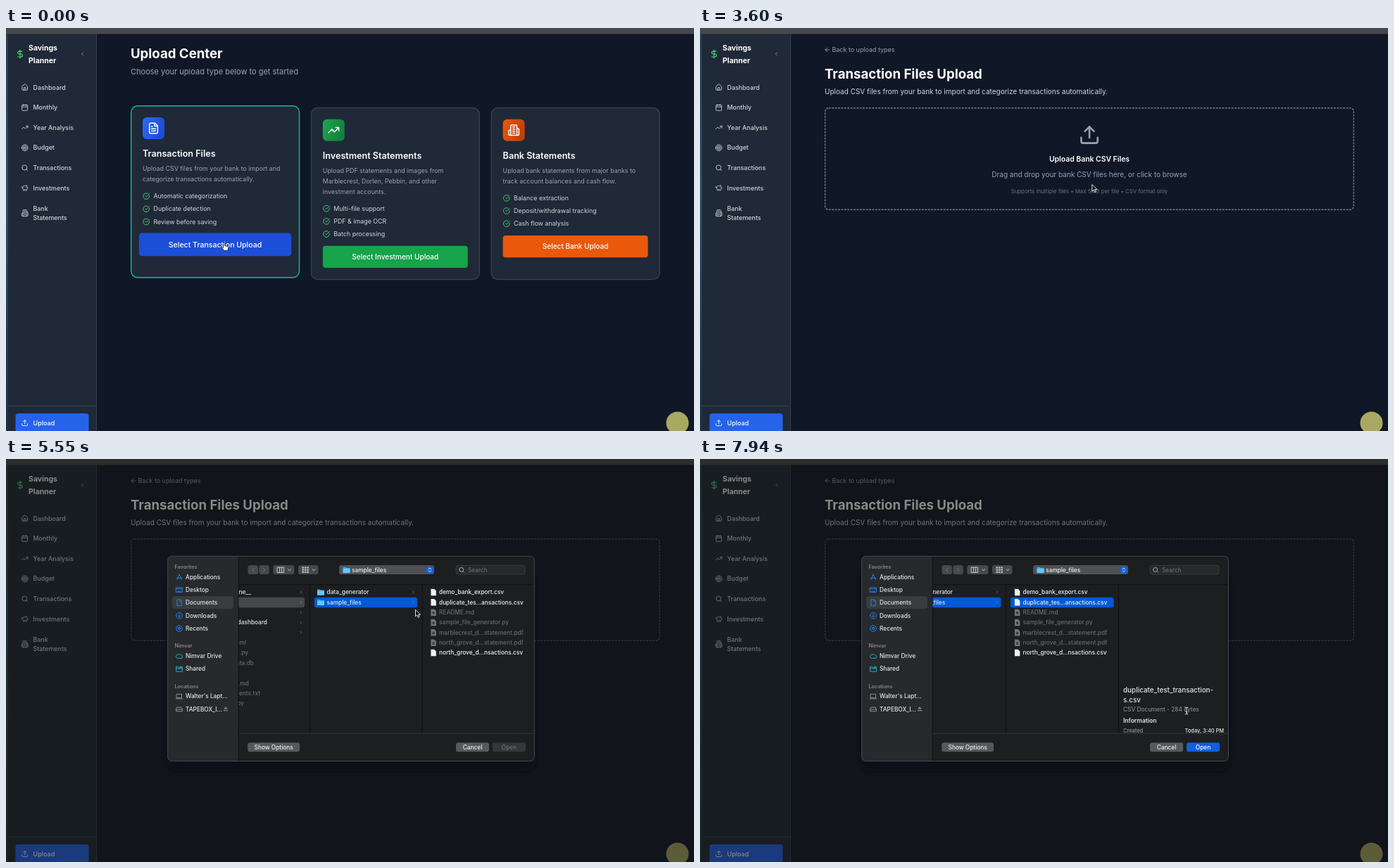
Animation, 977 px wide and 573 px high, one loop 8000 ms. Source, as an HTML page:

```html
<!DOCTYPE html>
<html lang="en">
<head>
<meta charset="utf-8">
<title>Upload Center</title>
<style>
html, body { margin: 0; width: 100%; height: 100%; overflow: hidden; background: #101726; }
svg { display: block; font-family: Inter, "Liberation Sans", sans-serif; white-space: pre; }
</style>
</head>
<body>
<svg id="stage" width="977" height="573" viewBox="0 0 977 573"></svg>
<script>
const stage = document.getElementById('stage');
const LOOP = 8000;

// Icons on a 24 unit grid
const ring = (x, y, r) => `M${x - r} ${y}a${r} ${r} 0 1 0 ${2 * r} 0a${r} ${r} 0 1 0 ${-2 * r} 0`;
const ICONS = {
  house: 'M3 10a2 2 0 0 1 .7-1.5l7-6a2 2 0 0 1 2.6 0l7 6A2 2 0 0 1 21 10v9a2 2 0 0 1-2 2H5a2 2 0 0 1-2-2zM15 21v-8H9v8',
  calendar: 'M8 2v4M16 2v4M3 10h18M5 4h14a2 2 0 0 1 2 2v14a2 2 0 0 1-2 2H5a2 2 0 0 1-2-2V6a2 2 0 0 1 2-2z',
  trend: 'M16 7h6v6M22 7l-8.5 8.5-5-5L2 17',
  target: ring(12, 12, 10) + ring(12, 12, 6) + ring(12, 12, 2),
  search: ring(11, 11, 8) + 'M21 21l-4.3-4.3',
  piggy: 'M11 17h3v2a1 1 0 0 0 1 1h2a1 1 0 0 0 1-1v-3a3.2 3.2 0 0 0 2-2h1a1 1 0 0 0 1-1v-2a1 1 0 0 0-1-1h-1a5 5 0 0 0-2-4V3a4 4 0 0 0-3.2 1.6l-.3.4H11a6 6 0 0 0-6 6v1a5 5 0 0 0 2 4v3a1 1 0 0 0 1 1h2a1 1 0 0 0 1-1zM16 10h.01M2 8v1a2 2 0 0 0 2 2h1',
  building: 'M6 22V4a2 2 0 0 1 2-2h8a2 2 0 0 1 2 2v18zM6 12H4a2 2 0 0 0-2 2v6a2 2 0 0 0 2 2h2M18 9h2a2 2 0 0 1 2 2v9a2 2 0 0 1-2 2h-2M10 6h4M10 10h4M10 14h4M10 18h4',
  upload: 'M21 15v4a2 2 0 0 1-2 2H5a2 2 0 0 1-2-2v-4M17 8l-5-5-5 5M12 3v12',
  file: 'M15 2H6a2 2 0 0 0-2 2v16a2 2 0 0 0 2 2h12a2 2 0 0 0 2-2V7zM14 2v6h6M16 13H8M16 17H8M10 9H8',
  check: 'M21.8 10A10 10 0 1 1 17 3.3M9 11l3 3L22 4',
  dollar: 'M12 2v20M17 5H9.5a3.5 3.5 0 0 0 0 7h5a3.5 3.5 0 0 1 0 7H6',
  back: 'M19 12H5M12 19l-7-7 7-7',
  left: 'M15 18l-6-6 6-6',
  right: 'M9 18l6-6-6-6',
  down: 'M6 9l6 6 6-6',
  updown: 'M7 9l5-5 5 5M7 15l5 5 5-5',
  apps: 'M12 3L5 20M12 3l7 17M3 15h18',
  desktop: 'M2 4h20v15H2zM2 8h20M6 16h12',
  page: 'M14 2H5v20h14V7zM14 2v5h5',
  download: ring(12, 12, 10) + 'M12 6v11M8 13l4 4 4-4',
  clock: ring(12, 12, 10) + ring(12, 12, 4) + 'M12 8v4h3',
  cloud: 'M17.5 19H8a6 6 0 1 1 2-11.5 5.5 5.5 0 0 1 9.5 3A4.3 4.3 0 0 1 17.5 19z',
  shared: 'M2 20V5h7l2 3h11v12zM2 11h20M15 5h7',
  laptop: 'M4 5h16v12H4zM1 20h22',
  drive: 'M5 6h14l3 7v6H2v-6zM2 13h20',
  columns: 'M2 4h20v16H2zM9 4v16M15.5 4v16'
};

const icon = (name, x, y, size, color, weight = 2) =>
  `<path d="${ICONS[name]}" transform="translate(${x - size / 2} ${y - size / 2}) scale(${size / 24})"
    fill="none" stroke="${color}" stroke-width="${weight}" stroke-linecap="round" stroke-linejoin="round"/>`;

// y is the middle of the capital letters
const text = (x, y, size, str, fill = '#fff', weight = 400, anchor = 'start') =>
  `<text x="${x}" y="${y + size * .36}" font-size="${size}" fill="${fill}" font-weight="${weight}" text-anchor="${anchor}">${str}</text>`;

const rect = (x, y, w, h, fill, r = 0, extra = '') =>
  `<rect x="${x}" y="${y}" width="${w}" height="${h}" rx="${r}" fill="${fill}" ${extra}/>`;

const line = (x1, y1, x2, y2, color) =>
  `<path d="M${x1} ${y1}L${x2} ${y2}" stroke="${color}"/>`;

const gradient = (id, a, b) =>
  `<linearGradient id="${id}" x2="1" y2=".4"><stop stop-color="${a}"/><stop offset="1" stop-color="${b}"/></linearGradient>`;

const DEFS = `<defs>
  ${gradient('blue', '#2b6bee', '#1d4ed8')}${gradient('green', '#1fa650', '#15803d')}${gradient('orange', '#ea580c', '#c2410c')}
  <linearGradient id="edge" x2="0" y2="1"><stop stop-color="#2b3a49"/><stop offset=".4" stop-color="#2c5069"/><stop offset="1" stop-color="#22303e"/></linearGradient>
  <filter id="soft" x="-10%" y="-10%" width="120%" height="120%"><feGaussianBlur stdDeviation="2.5"/></filter>
  <clipPath id="browser"><rect x="330.5" y="179" width="420" height="211"/></clipPath>
</defs>`;

const NAV = [['house', 'Dashboard'], ['calendar', 'Monthly'], ['trend', 'Year Analysis'],
  ['target', 'Budget'], ['search', 'Transactions'], ['piggy', 'Investments']];

function shell() {
  const soft = '#d1d5db';
  return rect(0, 0, 977, 573, '#101726') + rect(3, 8, 125.5, 565, '#1f2937') +
    line(128.5, 8, 128.5, 573, '#374151') + line(3, 537.5, 128, 537.5, '#374151') +
    rect(0, 0, 3, 573, 'url(#edge)') + rect(0, 0, 977, 8.5, '#46494d') +
    icon('dollar', 20, 37, 13.5, '#4ade80') + icon('left', 108.5, 37, 9, '#9ca3af') +
    text(32, 28, 10.5, 'Savings', '#fff', 700) + text(32, 46.5, 10.5, 'Planner', '#fff', 700) +
    NAV.map(([name, label], i) => {
      const y = 84.3 + i * 28.65;
      return icon(name, 26.7, y, 10.5, soft) + text(38.5, y, 8.9, label, soft, 500);
    }).join('') +
    icon('building', 26.7, 263, 10.5, soft) +
    text(38.5, 256.5, 8.9, 'Bank', soft, 500) + text(38.5, 269.5, 8.9, 'Statements', soft, 500) +
    rect(13.5, 548, 104, 32, '#2563eb', 4) +
    icon('upload', 26.7, 561.5, 10.5, '#fff') + text(38.5, 561.5, 9, 'Upload', '#fff', 500) +
    '<circle cx="953.5" cy="561.5" r="16" fill="#a9a862"/>';
}

const CARDS = [
  { x: 177, icon: 'file', tone: 'blue', button: '#1d4ed8', title: 'Transaction Files', action: 'Select Transaction Upload',
    about: ['Upload CSV files from your bank to import and', 'categorize transactions automatically.'],
    list: ['Automatic categorization', 'Duplicate detection', 'Review before saving'] },
  { x: 432.8, icon: 'trend', tone: 'green', button: '#16a34a', title: 'Investment Statements', action: 'Select Investment Upload',
    about: ['Upload PDF statements and images from', 'Marblecrest, Dorlen, Pebbin, and other', 'investment accounts.'],
    list: ['Multi-file support', 'PDF &amp; image OCR', 'Batch processing'] },
  { x: 688.6, icon: 'building', tone: 'orange', button: '#ea580c', title: 'Bank Statements', action: 'Select Bank Upload',
    about: ['Upload bank statements from major banks to', 'track account balances and cash flow.'],
    list: ['Balance extraction', 'Deposit/withdrawal tracking', 'Cash flow analysis'] }
];

function card(c, i) {
  const hover = i === 0, left = c.x + 17, first = 212 + c.about.length * 14.8;
  const mid = first + 69, zoom = hover ? 1.05 : 1, cx = c.x + 120;
  return `<g transform="translate(0 ${hover ? -2.7 : 0})">` +
    rect(c.x + .7, 113.5, 238.8, 244, '#1f2937', 9, `stroke="${hover ? '#14b8a6' : '#374151'}" stroke-width="1.4"`) +
    rect(left, 129.7, 31, 31, `url(#${c.tone})`, 6) + icon(c.icon, left + 15.5, 145.2, 17.5, '#fff') +
    text(left, 181, 12.6, c.title, '#fff', 600) +
    c.about.map((s, n) => text(left, 202.8 + n * 14.8, 8.9, s, '#9ca3af')).join('') +
    c.list.map((s, n) => icon('check', left + 5.2, first + .2 + n * 18.2, 10.5, '#4ade80') +
      text(left + 15.5, first + n * 18.2, 8.9, s, '#d1d5db')).join('') +
    `<g transform="translate(${cx} ${mid}) scale(${zoom})">` +
    rect(-103, -15.6, 206, 31.2, c.button, 4) + text(0, 0, 10.05, c.action, '#fff', 500, 'middle') + '</g></g>';
}

const chooser = () => text(177, 36.5, 18.6, 'Upload Center', '#fff', 700) +
  text(177, 62, 11, 'Choose your upload type below to get started', '#9ca3af') + CARDS.map(card).join('');

const dropPage = hover => icon('back', 180.8, 31, 10, '#9ca3af') +
  text(187.5, 31, 8.95, 'Back to upload types', '#9ca3af') +
  text(177, 65, 18.6, 'Transaction Files Upload', '#fff', 700) +
  text(177, 90, 10, 'Upload CSV files from your bank to import and categorize transactions automatically.', '#d1d5db') +
  rect(177.7, 113.7, 750.6, 144.6, 'none', 5,
    `stroke="${hover ? '#747b88' : '#4b5563'}" stroke-width="1.4" stroke-dasharray="2.9 1.5"`) +
  icon('upload', 553, 152, 31, '#9ca3af') +
  text(553, 186, 10.4, 'Upload Bank CSV Files', '#fff', 600, 'middle') +
  text(553, 208.5, 10, 'Drag and drop your bank CSV files here, or click to browse', '#9ca3af', 400, 'middle') +
  text(553, 232, 7.8, 'Supports multiple files • Max 5MB per file • CSV format only', '#6b7280', 400, 'middle');

// File dialog
const folder = (x, y) => `<path d="M${x - 5} ${y - 4}h4l1 1.2h5v7h-10z" fill="#35b5f0"/>` +
  rect(x - 5, y - 1.6, 10, 5.8, '#5ecbfa', .8);

const sheet = (x, y, fill, mark) =>
  `<path d="M${x - 3.6} ${y - 4.7}h4.7l2.7 2.7v6.8h-7.4z" fill="${fill}"/>` +
  (mark ? rect(x - 1.5, y - 1, 3, 3.5, '#3a3b3d', .5) : '');

const row = n => 189.4 + n * 14.35;
const label = (x, y, str, fill, anchor) => text(x, y, 8.3, str, fill, 500, anchor);
const bar = (x, w, n, color) => rect(x, row(n) - 6.9, w, 14.4, color, 3);

const PLACES = [['apps', 'Applications', 168], ['desktop', 'Desktop', 186.3], ['page', 'Documents', 204.3],
  ['download', 'Downloads', 222.6], ['clock', 'Recents', 241], ['cloud', 'Nimvar Drive', 280.2],
  ['shared', 'Shared', 298.3], ['laptop', "Walter's Lapt...", 337.4], ['drive', 'TAPEBOX_I...', 355.7]];
const FILES = ['demo_bank_export.csv', 'duplicate_tes...ansactions.csv', 'README.md', 'sample_file_generator.py',
  'marblecrest_d...statement.pdf', 'north_grove_d...statement.pdf', 'north_grove_d...nsactions.csv'];
// Visible ends of the names in the scrolled parent column: row, right edge, name
const PARENTS = [[0, 348, 'ne__'], [3, 371, 'dashboard'], [5, 341, 'ml'], [6, 344, '.py'], [7, 352, 'ata.db'],
  [9, 345, '.md'], [10, 361, 'ents.txt'], [11, 338, 'py']];

function places(active) {
  const tint = y => y < 250 ? '#1e8dff' : y < 310 ? '#19bfd0' : '#9a9c9f';
  return [['Favorites', 153.5], ['Nimvar', 265.5], ['Locations', 323]]
    .map(([s, y]) => text(239.5, y, 7.2, s, '#85878a', 600)).join('') +
    rect(236, 195, 87, 18, active ? '#3a3b3e' : '#34373b', 4) +
    `<g opacity="${active ? 1 : .42}">` +
    PLACES.map(([name, s, y]) => icon(name, 246, y, 10.5, tint(y)) + label(255, y, s, '#e6e6e7')).join('') +
    '</g><path d="M309 355.5l3-3.5 3 3.5zM309 357h6v1.2h-6z" fill="#85878a"/>';
}

function browser(t, active) {
  const blue = '#0059d6', grey = '#464749', moved = t >= 7790;
  const parent = !active || (t >= 7490 && t < 7640) ? grey : blue;
  const picked = t >= 7640 ? blue : '#0b4fb5';
  const chevron = (x, n) => icon('right', x, row(n), 7, '#96989b');
  let s = '';
  if (!moved) {
    s += bar(300, 124, 1, grey) + [0, 1, 2, 3, 4].map(n => chevron(419, n)).join('') +
      PARENTS.map(([n, x, name]) => label(x, row(n), name, n < 5 ? '#e6e6e7' : '#68696b', 'end')).join('');
  }
  s += bar(438, 146, 1, parent) + (t >= 7490 ? bar(597.5, 146.5, 1, picked) : '') +
    ['data_generator', 'sample_files'].map((name, n) =>
      folder(447, row(n)) + label(455.5, row(n), name, '#e9e9ea') + chevron(578.5, n)).join('') +
    FILES.map((name, n) => {
      const usable = name.endsWith('csv');
      return sheet(607, row(n), usable ? '#f0f0f1' : '#737476', !usable) +
        label(615, row(n), name, usable ? '#f0f0f1' : '#68696b');
    }).join('') +
    [431.5, 591, 751].map(x => line(x, 179, x, 390, '#0e0f10')).join('');
  const preview = text(601, 328.5, 9.9, 'duplicate_test_transaction-', '#e6e6e7', 500) +
    text(601, 342.5, 9.9, 's.csv', '#e6e6e7', 500) +
    text(601, 356.5, 8.3, 'CSV Document - 284 bytes', '#97989a') +
    text(601, 372, 8.5, 'Information', '#e6e6e7', 600) +
    text(601, 386.7, 7.4, 'Created', '#97989a', 500) +
    text(744, 386.7, 7.4, 'Today, 3:40 PM', '#e6e6e7', 500, 'end');
  return `<g clip-path="url(#browser)"><g transform="translate(${moved ? -156.5 : 0})">${s}</g>${moved ? preview : ''}</g>`;
}

function toolbar(active) {
  const y = 157.7, top = 151, fill = '#47484a', mark = '#d5d5d6';
  let grid = '';
  for (let i = 0; i < 9; i++) grid += rect(420.5 + i % 3 * 3.4, 153.3 + Math.floor(i / 3) * 3.2, 2.5, 2.3, '#b9babb');
  return rect(343.5, top, 14.5, 13, fill, 3) + rect(359.3, top, 14.5, 13, fill, 3) +
    icon('left', 350.7, y, 10, '#85868a') + icon('right', 366.7, y, 10, '#85868a') +
    rect(379.3, top, 30, 13, fill, 3) + icon('columns', 390, y, 11, mark) + icon('down', 402.5, y, 8, mark, 3) +
    rect(415, top, 28.5, 13, fill, 3) + grid + icon('down', 437, y, 8, mark, 3) +
    rect(473, top, 135, 13, '#505154', 3) + folder(483.5, y) + label(491, y, 'sample_files', '#f0f0f1') +
    (active ? rect(597, 152.7, 9.5, 10, '#0f62e6', 2.5) : '') + icon('updown', 601.8, y, 8.5, '#fff', 2.6) +
    rect(639, top + .3, 98, 12.7, '#27282a', 3, 'stroke="#3f4042" stroke-width=".8"') +
    icon('search', 647, y, 9, mark) + text(656, y, 8.3, 'Search', '#77787b');
}

const button = (x, w, str, fill, color) =>
  rect(x, 403.3, w, 13, fill, 3) + label(x + w / 2, 409.8, str, color, 'middle');

function dialog(t) {
  const settled = t >= 3900, active = t >= 4050, ready = t >= 7790;
  const shade = settled ? rect(0, 0, 977, 573, '#12130e', 0, 'opacity=".5"') : rect(0, 0, 977, 573, '#18191a', 0, 'opacity=".37"');
  const glow = settled
    ? rect(228, 160, 524, 284, '#0d0f12', 16, 'filter="url(#soft)" opacity=".6"')
    : rect(206, 126, 570, 340, '#1a1b1c', 26, 'filter="url(#soft)"') + rect(222, 132, 536, 316, '#10121b', 20, 'filter="url(#soft)"');
  return shade + `<g transform="translate(0 ${settled ? 0 : -4.5})">` + glow +
    rect(229.5, 138, 521, 291.7, '#1d1e20', 6) +
    `<path d="M330 138V429.7H235.5a6 6 0 0 1-6-6V144a6 6 0 0 1 6-6z" fill="${active ? '#27292c' : '#222528'}"/>` +
    line(330.2, 138, 330.2, 429.5, '#101112') + line(331, 178.7, 750, 178.7, '#0f1011') + line(331, 390.3, 750, 390.3, '#343537') +
    toolbar(active) + places(active) + browser(t, active) +
    button(343.3, 73.7, 'Show Options', '#57585a', '#f0f0f1') + button(639, 47, 'Cancel', '#57585a', '#f0f0f1') +
    button(691, 47, 'Open', ready ? '#0f5fe0' : '#353638', ready ? '#fff' : '#6c6d6f') +
    rect(229.7, 138.2, 520.6, 291.3, 'none', 6, 'stroke="#515255" stroke-width=".8"') + '</g>';
}

// Pointer: start time, x, y, shape
const MOVES = [[0, 306, 305, 'hand'], [1050, 309, 305.5], [2550, 346.3, 302.7], [2700, 526.5, 234.7],
  [2850, 556.5, 223], [3000, 553.5, 223, 'hand'], [3600, 556.8, 222.5], [5550, 581.5, 214.3], [5700, 603.7, 207.3],
  [5850, 613.2, 203.5], [6000, 619.8, 202.5], [6150, 631.3, 202.3], [6300, 637, 203], [6450, 637.5, 204],
  [6900, 640, 203.7], [7050, 657.7, 201.5], [7200, 658.7, 201.3], [7790, 670.8, 278.7], [7940, 691, 358, 'beam']];
const BEAM = 'M-2.3-5Q0-5 0-3.5V3.5Q0 5-2.3 5M2.3-5Q0-5 0-3.5M2.3 5Q0 5 0 3.5M-1.2 1.5h2.4';
const POINTERS = {
  arrow: '<path d="M0 0V9.5L2.3 7.5 3.8 11 5.4 10.3 3.9 7H7z" fill="#000" stroke="#fff" stroke-width=".9" stroke-linejoin="round"/>',
  hand: '<path d="M2.7 1.2a1 1 0 0 1 2 0V4.8l3.6.8q1.6.4 1.3 2L8.8 11.5H4L.6 7.8q.2-1.5 1.4-.7l.7.6z" fill="#fff" stroke="#111" stroke-width=".7"/>',
  beam: `<path d="${BEAM}" fill="none" stroke="#000" stroke-width="2"/><path d="${BEAM}" fill="none" stroke="#fff"/>`
};

function pointer(t) {
  const [, x, y, shape = 'arrow'] = MOVES.findLast(m => m[0] <= t);
  return `<g transform="translate(${x} ${y})">${POINTERS[shape]}</g>`;
}

const scene = t => DEFS + shell() + (t < 1050 ? chooser() : dropPage(t >= 2850 && t < 3900)) +
  (t >= 3750 ? dialog(t) : '') + pointer(t);

// The picture only changes at these moments
const STEPS = [...MOVES.map(m => m[0]), 3750, 3900, 4050, 7490, 7640].sort((a, b) => a - b);
let shown = -1;

function draw(now) {
  const step = STEPS.findLast(s => s <= now % LOOP) ?? 0;
  if (step !== shown) stage.innerHTML = scene(shown = step);
  requestAnimationFrame(draw);
}
draw(0);
</script>
</body>
</html>
```
